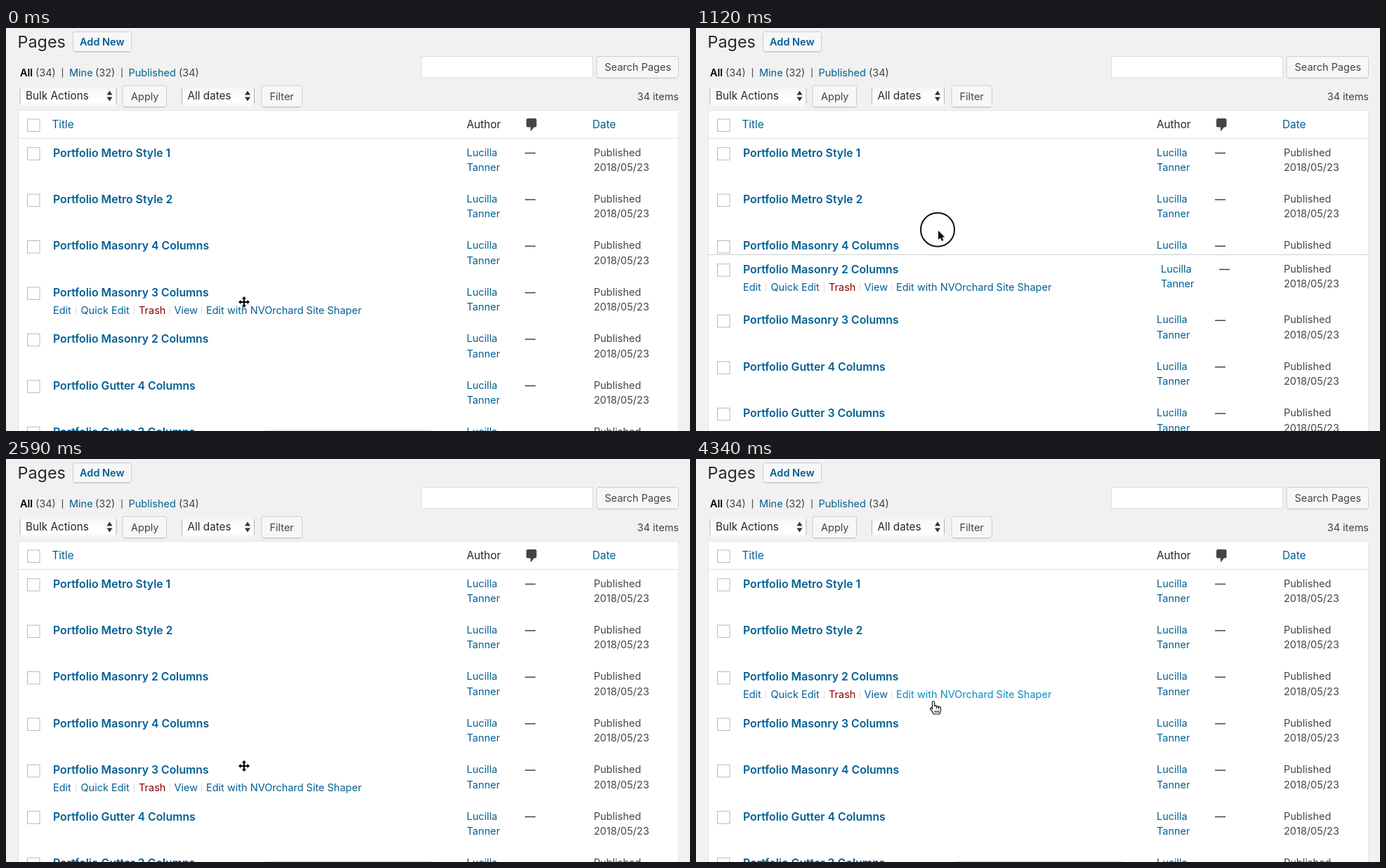
Recreate the animation shown at these times as an HTML page. Size 974 by 575 pixels, loop 4410 ms.

```html
<!DOCTYPE html>
<html lang="en">
<head>
<meta charset="utf-8">
<title>Pages</title>
<style>
  html, body { margin: 0; width: 100%; height: 100%; overflow: hidden; background: #f1f1f1; }
  svg { display: block; width: 974px; height: 575px; }
  text { font-family: Inter, "Open Sans", sans-serif; font-size: 14.5px; fill: #444; white-space: pre; }
  .link { fill: #005f92; }
  .hot { fill: #0c8bc2; }
  .trash { fill: #8c0000; }
  .dark { fill: #23282d; }
  .bold { font-weight: 600; }
  .head { font-size: 15.3px; }
  .title { font-size: 15.8px; }
  .button { fill: #f7f7f7; stroke: #ccc; }
  .box { fill: #fff; stroke: #b4b9be; }
  .sep { stroke: #ddd; }
</style>
</head>
<body>
<svg id="stage" viewBox="0 0 974 575"></svg>
<script>
const LOOP = 4410, STEP = 70;
const TOP = 157, ROW = 66.4, GAP = 39.6;
const stage = document.getElementById('stage');

function add(parent, tag, attrs = {}, content) {
  const el = document.createElementNS('http://www.w3.org/2000/svg', tag);
  for (const key in attrs) el.setAttribute(key, attrs[key]);
  if (content !== undefined) el.textContent = content;
  parent.append(el);
  return el;
}
const label = (parent, x, y, content, cls = '', attrs = {}) =>
  add(parent, 'text', { x, y, class: cls, ...attrs }, content);
const rect = (parent, x, y, width, height, attrs) =>
  add(parent, 'rect', { x, y, width, height, ...attrs });
const path = (parent, d, attrs) => add(parent, 'path', { d, ...attrs });
const show = (el, on) => el.setAttribute('visibility', on ? 'visible' : 'hidden');
const move = (el, x, y) => el.setAttribute('transform', `translate(${x} ${y})`);

function button(x, y, w, h, textX, baseline, content, cls) {
  path(stage, `M${x + 2} ${y + h + 1}h${w - 4}`, { stroke: '#d5d5d5' });
  rect(stage, x, y, w, h, { class: 'button', rx: 3 });
  label(stage, textX, baseline, content, cls);
}

function select(x, w, content) {
  rect(stage, x, 83, w, 28, { rx: 5, fill: 'url(#edge)' });
  rect(stage, x + 1, 81.5, w - 2, 31, { rx: 5, fill: 'url(#face)' });
  label(stage, x + 8.5, 102.4, content, 'head dark');
  const a = x + w - 10;
  path(stage, `M${a - 4} 95.5l4-6 4 6zM${a - 4} 98.5l4 6 4-6z`, { fill: '#333' });
}

function checkbox(parent, y) {
  rect(parent, 30.5, y, 17.5, 17.5, { class: 'box' });
}

function gradient(id, stops, attrs) {
  const g = add(stage, 'linearGradient', { id, ...attrs });
  stops.forEach(([offset, color]) => add(g, 'stop', { offset, 'stop-color': color }));
}

function drawHeader() {
  gradient('edge', [[0, '#aaa'], [.04, '#eee'], [.96, '#eee'], [1, '#aaa']]);
  gradient('face', [[0, '#f1f1f1'], [.3, '#fafafa'], [.75, '#fff'], [1, '#f4f4f4']], { x2: 0, y2: 1 });

  label(stage, 16.5, 28, 'Pages', 'dark', { style: 'font-size:23.4px' });
  button(95.5, 5.5, 83, 28, 105, 25, 'Add New', 'link bold');

  label(stage, 20, 69, 'All', 'bold', { style: 'fill:#000' });
  label(stage, 42, 69, '(34)');
  label(stage, 90, 69, 'Mine', 'link');
  label(stage, 127, 69, '(32)');
  label(stage, 174.5, 69, 'Published', 'link');
  label(stage, 246, 69, '(34)');
  path(stage, 'M80.500 57.500v13M165 57.500v13', { stroke: '#555', 'stroke-width': 1.2 });

  rect(stage, 591.5, 40.5, 244, 30, { fill: '#fff', stroke: '#ddd' });
  button(841, 40.5, 116.5, 30.5, 852.5, 61, 'Search Pages');
  select(19.5, 138, 'Bulk Actions');
  button(166, 82, 62.5, 30.5, 178, 102.5, 'Apply');
  select(250, 104, 'All dates');
  button(364, 82, 57.5, 30.5, 375.5, 102.5, 'Filter');
  label(stage, 958, 102.5, '34 items', '', { 'text-anchor': 'end' });

  rect(stage, 17.5, 117.5, 940, 470, { fill: '#fff', stroke: '#e5e5e5' });
  path(stage, 'M18 157.5H957', { stroke: '#e1e1e1' });
  checkbox(stage, 130);
  label(stage, 65.5, 143, 'Title', 'head link');
  label(stage, 656, 143, 'Author', 'head dark');
  path(stage, 'M743 129h10.500q2 0 2 2v8.500q0 2-2 2h-1.500l-5 6v-6h-4q-2 0-2-2v-8.500q0-2 2-2z', { fill: '#444' });
  label(stage, 835, 143, 'Date', 'head link');
}

function makeRow(name) {
  const g = add(stage, 'g');
  const back = rect(g, 18, 0, 939, ROW, { fill: '#fff' });
  const line = path(g, 'M18 .3H957', { stroke: '#d4d4d4', 'stroke-width': 1.3 });
  checkbox(g, 13.7);
  label(g, 67, 26.6, 'Portfolio ' + name, 'title bold link');

  const mid = add(g, 'g');
  label(mid, 656, 25.6, 'Lucilla', 'link');
  label(mid, 656, 47.1, 'Tanner', 'link');
  path(mid, 'M739 21.5h15', { stroke: '#444', 'stroke-width': 1.5 });
  label(g, 837, 25.6, 'Published');
  label(g, 837, 47.1, '2018/05/23');

  const actions = add(g, 'g');
  label(actions, 67, 51.6, 'Edit', 'link');
  label(actions, 106.5, 51.6, 'Quick Edit', 'link');
  label(actions, 189, 51.6, 'Trash', 'trash');
  label(actions, 239.5, 51.6, 'View', 'link');
  const edit = label(actions, 285, 51.6, 'Edit with NVOrchard Site Shaper', 'link');
  [99.5, 182.5, 233.5, 278.5].forEach(x => path(actions, `M${x} 40v13`, { class: 'sep' }));
  return { g, back, line, mid, actions, edit };
}

function makeCursors() {
  const outline = { stroke: '#fff', 'stroke-width': 1.6, 'stroke-linejoin': 'round', 'paint-order': 'stroke' };
  const cross = add(stage, 'g');
  const arm = 'M-1-1V-4.500H-3.300L0-8 3.300-4.500H1V-1H4.500V-3.300L8 0 4.500 3.300V1H1V4.500H3.300L0 8-3.300 4.500H-1V1H-4.500V3.300L-8 0-4.500-3.300V-1z';
  path(cross, arm, outline);
  const arrow = add(stage, 'g');
  path(arrow, 'M0 0V13L3 10.300 5 15 7.300 14 5.300 9.500H9.300z', { fill: '#000', ...outline });
  const hand = add(stage, 'g');
  path(hand, 'M-1.500 9V1.500Q-1.500-.5 0-.5T1.700 1.500V6.500Q3.500 5.300 4.700 7 6.300 6 7.500 7.700 10 7 10.500 9.500V12.500Q10 15 8.800 18H.5Q-1 14.500-4 11.500-5 9.500-3.500 9T-1.500 11zM4.700 7v3M7.500 7.700v3M2.500 13v3M5 13v3M7.300 13v3',
    { fill: '#fff', stroke: '#111', 'stroke-width': 1.2, 'stroke-linejoin': 'round' });
  return { cross, arrow, hand };
}

const pointer = [
  [0, 339, 391], [210, 339, 391], [490, 335.5, 438], [770, 335.5, 438], [840, 335.5, 419],
  [910, 337, 388], [980, 340, 354], [1050, 343, 320], [1120, 345, 289], [1190, 346, 280],
  [1330, 348, 271], [1750, 348, 271], [1820, 348, 277], [1890, 347, 286], [2030, 345, 320],
  [2380, 340, 430], [2520, 339, 438], [2800, 339, 438], [2870, 339, 425], [3080, 339, 349],
  [3290, 339, 352], [3640, 338, 346]
];
const drags = [
  { id: 4, press: 770, lift: 910, release: 1190, drop: 1260,
    keys: [[910, 404], [980, 376], [1050, 350], [1120, 323], [1190, 298]] },
  { id: 3, press: 2800, lift: 2940, release: 3220, drop: 3290,
    keys: [[2940, 397], [3080, 337], [3220, 340]] }
];
const orders = [[0, 1, 2, 3, 4, 5, 6], [0, 1, 4, 2, 3, 5, 6], [0, 1, 4, 3, 2, 5, 6]];

// Linear interpolation through [time, ...values] keys.
function sample(keys, t) {
  const i = keys.findIndex(k => k[0] > t);
  if (i < 0) return keys[keys.length - 1].slice(1);
  if (i === 0) return keys[0].slice(1);
  const a = keys[i - 1], b = keys[i], f = (t - a[0]) / (b[0] - a[0]);
  return a.slice(1).map((v, n) => v + (b[n + 1] - v) * f);
}

function onLink(t) {
  const offset = (sample(pointer, t)[1] - TOP) % ROW;
  return offset > 36 && offset < 58;
}

drawHeader();
const rows = ['Metro Style 1', 'Metro Style 2', 'Masonry 4 Columns', 'Masonry 3 Columns',
  'Masonry 2 Columns', 'Gutter 4 Columns', 'Gutter 3 Columns'].map(makeRow);
const dock = path(stage, 'M368 574.5Q372 573.500 386 573.500H590Q604 573.500 608 574.500V575H368z', { fill: '#e2e2e2' });
const ring = add(stage, 'circle', { fill: 'none', stroke: '#111', 'stroke-width': 2 });
const cursors = makeCursors();

function render(t) {
  const [x, y] = sample(pointer, t);
  const drag = drags.find(d => t >= d.press && t < d.drop);
  const lifted = drag && t >= drag.lift;
  const order = orders[drags.filter(d => t >= d.drop).length];
  const hovered = drag ? drag.id : order[Math.floor((y - TOP) / ROW)];
  const helperY = lifted ? sample(drag.keys, t)[0] : 0;
  const slot = lifted ? Math.ceil((helperY - TOP) / ROW - .45) : -1;

  let top = TOP;
  order.filter(id => !lifted || id !== drag.id).forEach((id, i) => {
    if (i === slot) top += GAP;
    move(rows[id].g, 0, top);
    top += ROW;
  });
  rows.forEach((row, id) => {
    const held = lifted && id === drag.id;
    if (held) {
      move(row.g, 0, helperY);
      if (dock.previousSibling !== row.g) stage.insertBefore(row.g, dock);
    }
    show(row.back, held);
    show(row.line, held);
    move(row.mid, held ? 6 : 0, 0);
    show(row.actions, id === hovered);
    row.edit.setAttribute('class', !drag && onLink(t - STEP) ? 'hot' : 'link');
  });
  show(dock, !lifted);

  const kind = t >= 1120 && t < 1330 ? 'arrow' : !drag && onLink(t) ? 'hand' : 'cross';
  for (const name in cursors) {
    show(cursors[name], name === kind);
    move(cursors[name], x, y);
  }
  const pressed = drag && t < drag.release;
  show(ring, pressed);
  if (pressed) {
    move(ring, x - 1, y - 1.3);
    ring.setAttribute('r', t >= drag.release - STEP ? 24 : 20.5);
  }
}

const start = performance.now();
function tick() {
  const t = (performance.now() - start) % LOOP;
  render(Math.floor(t / STEP) * STEP);
  requestAnimationFrame(tick);
}
tick();
</script>
</body>
</html>
```
